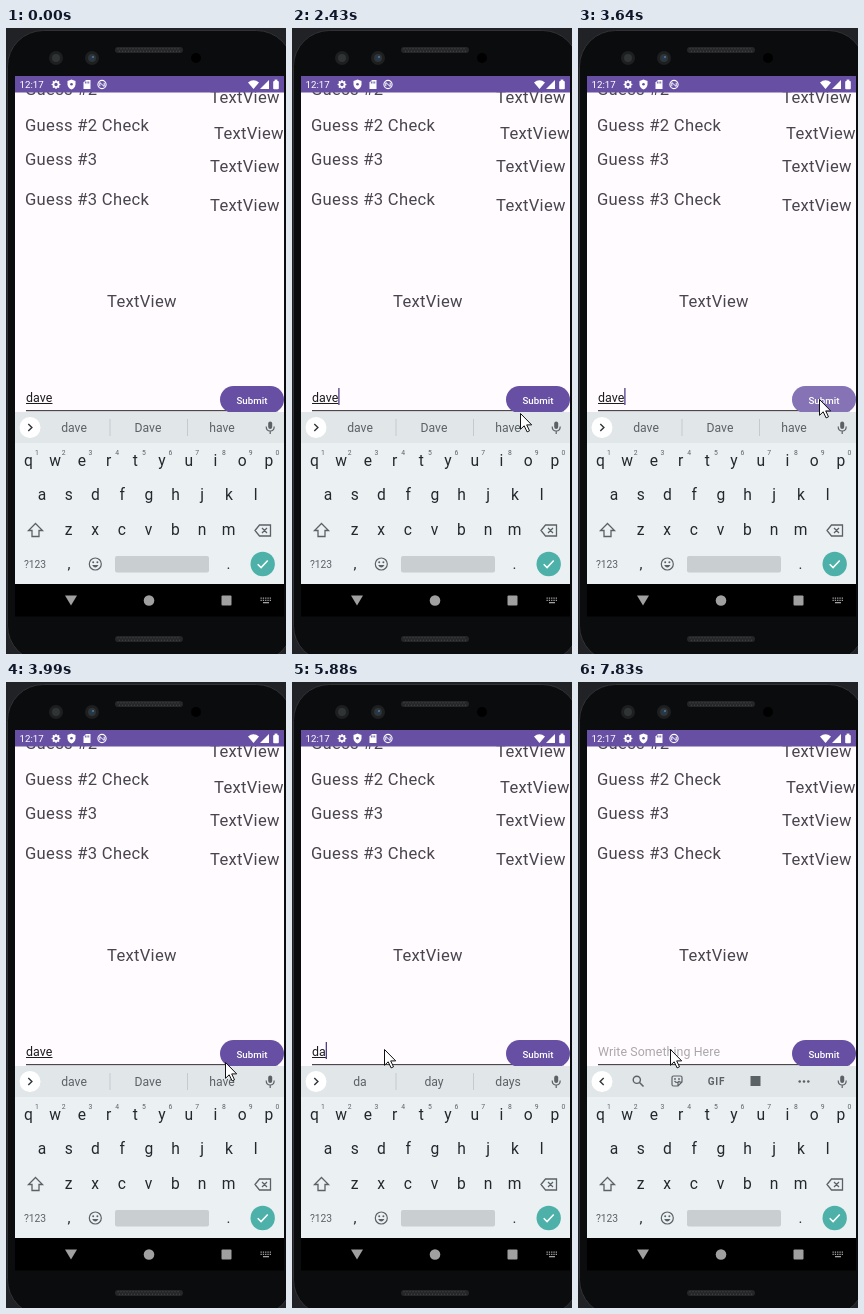
Animation of 280x626 px, one loop 8000 ms. Source, as an HTML page with a canvas:

```html
<!DOCTYPE html>
<html lang="en">
<head>
<meta charset="utf-8">
<title>Guessing app</title>
<style>
  html, body { margin: 0; width: 280px; height: 626px; overflow: hidden; background: #202226; }
  canvas { display: block; width: 280px; height: 626px; }
</style>
</head>
<body>
<canvas id="stage"></canvas>
<script>
const W = 280, H = 626, LOOP = 8000;
const canvas = document.getElementById('stage');
const ctx = canvas.getContext('2d');
const ratio = window.devicePixelRatio || 1;
canvas.width = W * ratio;
canvas.height = H * ratio;

const PURPLE = '#6750a4', INK = '#49454f', KEY = '#22292d', ICON = '#5b6266';

// Each burst: start, time per step, then pointer positions held step by step.
const bursts = [
  [330, 70, [[259, 608], [259, 556], [258, 505], [257, 468], [257, 447], [257, 438]]],
  [950, 70, [[245, 431], [238, 427], [232, 423], [228, 420], [226, 419]]],
  [2430, 80, [[228, 385], [231, 379], [235, 375], [238, 373], [240, 372], [241, 371]]],
  [3920, 70, [[236, 374], [219, 380], [196, 382], [171, 380], [148, 376], [125, 370],
              [106, 365], [96, 363], [91, 363], [91, 364], [92, 367]]]
];
const caretToggles = [130, 630, 1160, 1690, 2160, 2640, 3160, 3710, 4200, 4750, 5280, 6820, 7370, 7830];
const typed = [[0, 'dave'], [5610, 'dav'], [5810, 'da'], [6080, 'd'], [6350, '']];
const hints = [
  [0, ['dave', 'Dave', 'have']], [5680, ['dav', 'Dave', 'day']], [5880, ['da', 'day', 'days']],
  [6150, ['d', 'do', 'did']], [6420, []], [6490, null]
];

const latest = (list, t) => list.filter(([at]) => at <= t).pop()[1];
const clamp = v => Math.max(0, Math.min(1, v));

function rect(x, y, w, h, color, r = 0) {
  ctx.fillStyle = color;
  ctx.beginPath();
  ctx.roundRect(x, y, w, h, r);
  ctx.fill();
}

function disc(x, y, r, color) {
  ctx.fillStyle = color;
  ctx.beginPath();
  ctx.arc(x, y, r, 0, Math.PI * 2);
  ctx.fill();
}

function ring(x, y, r, color, width = 1.2) {
  ctx.strokeStyle = color;
  ctx.lineWidth = width;
  ctx.beginPath();
  ctx.arc(x, y, r, 0, Math.PI * 2);
  ctx.stroke();
}

function shape(x, y, d, { fill, stroke, width = 1.2 }) {
  const path = new Path2D(d);
  ctx.save();
  ctx.translate(x, y);
  if (fill) { ctx.fillStyle = fill; ctx.fill(path); }
  if (stroke) { ctx.strokeStyle = stroke; ctx.lineWidth = width; ctx.stroke(path); }
  ctx.restore();
}

function text(str, x, y, size, color, { align = 'left', weight = 400, spacing = 0 } = {}) {
  ctx.font = `${weight} ${size}px Roboto, sans-serif`;
  ctx.letterSpacing = spacing + 'px';
  ctx.textAlign = align;
  ctx.fillStyle = color;
  ctx.fillText(str, x, y);
  return ctx.measureText(str).width;
}

function speaker(y) {
  rect(109, y - 3, 68, 6, '#252627', 3);
  for (let row = 0; row < 2; row++)
    for (let x = 112 + row * 1.5; x < 175; x += 3) disc(x, y - 1.2 + row * 2.4, .7, '#414344');
}

function drawPhone() {
  rect(0, 0, W, H, '#202226');
  rect(1.5, 2.5, 285, 631, '#0b0c0d', 36);
  ctx.strokeStyle = '#303236';
  ctx.lineWidth = 1;
  ctx.stroke();
  speaker(22);
  speaker(611);
  for (const x of [50, 86]) {
    disc(x, 30, 7, '#1d1f20');
    disc(x, 30, 4, '#303435');
  }
  disc(86, 30, 2.5, '#26394d');
  disc(87, 29, 1, '#5b7691');
  disc(190, 30, 5, '#000');
}

function drawStatusBar() {
  rect(9, 48, 269, 16.5, PURPLE);
  const white = '#fff';
  text('12:17', 13.5, 60.3, 9.7, white);
  ring(50, 56.5, 2.6, white, 1.8);
  for (let i = 0; i < 8; i++) {
    const a = i * Math.PI / 4;
    disc(50 + Math.cos(a) * 3.7, 56.5 + Math.sin(a) * 3.7, .8, white);
  }
  shape(65.5, 56.5, 'M0-5L4-3.4V0Q3.6 3.6 0 5Q-3.6 3.6-4 0V-3.4Z', { fill: white });
  disc(65.5, 56.3, 1.3, PURPLE);
  shape(81, 56.5, 'M-1-4.5H3.5V4.5H-3.5V-2Z', { fill: white });
  for (const x of [79.3, 81, 82.7]) rect(x - .4, 53.4, .9, 2, PURPLE);
  ring(96, 56.5, 4.1, white, 1.1);
  shape(96, 56.5, 'M-2.2 1.8V-2L2.2 2V-1.8', { stroke: white, width: 1 });
  shape(247.5, 56.5, 'M0 4.5L-5.5-2Q0-6.5 5.5-2Z', { fill: white });
  shape(259, 56.5, 'M4-4.5V4.5H-5Z', { fill: white });
  rect(267.2, 53, 5.6, 8.3, white, 1);
  rect(268.6, 51.6, 2.8, 2, white);
}

function drawContent() {
  rect(9, 48, 269, 336, '#fffbfe');
  const labels = [
    ['Guess #2', 19, 67], ['TextView', 204, 75], ['Guess #2 Check', 19, 103], ['TextView', 208, 111],
    ['Guess #3', 19, 137.3], ['TextView', 204, 144], ['Guess #3 Check', 19, 177], ['TextView', 204, 183],
    ['TextView', 101, 279]
  ];
  ctx.save();
  ctx.beginPath();
  ctx.rect(9, 64, 269, 320);
  ctx.clip();
  for (const [label, x, y] of labels) text(label, x, y, 16.6, INK, { spacing: .3 });
  ctx.restore();
}

function drawField(t) {
  const word = latest(typed, t);
  const caretOn = caretToggles.filter(at => at <= t).length % 2 === 1;
  let width = 0;
  rect(20, 382, 252, 1.3, '#4a474e');
  if (word) {
    width = text(word, 20, 373.5, 12.4, '#1c1b1f', { spacing: .08 });
    rect(20, 375, width, 1, '#1c1b1f');
  } else {
    text('Write Something Here', 20, 373.5, 12.4, '#aaa7aa', { spacing: .08 });
  }
  if (caretOn) rect(20 + width - (word ? .2 : 0), 360, 1.3, 17, '#4f3d8a');
}

function drawButton(t) {
  ctx.save();
  ctx.beginPath();
  ctx.rect(9, 340, 269, 44);
  ctx.clip();
  rect(214, 358, 64, 27, PURPLE, 13.5);
  if (t >= 3270 && t < 3710) {
    ctx.clip();
    const grow = clamp((t - 3230) / 250);
    ctx.globalAlpha = .2 * clamp((t - 3230) / 90);
    disc(241 + 5 * grow, 371.5, 8 + 32 * grow, '#fff');
    ctx.globalAlpha = 1;
  }
  text('Submit', 246, 375.5, 9.7, '#fff', { align: 'center', weight: 500, spacing: .05 });
  ctx.restore();
}

function drawTools() {
  ring(58.8, 397.8, 3.6, ICON, 1.4);
  shape(61.5, 400.5, 'M0 0L4 4', { stroke: ICON, width: 1.6 });
  shape(99, 399, 'M-5-3.5Q-5-5-3.5-5H3.5Q5-5 5-3.5V1L1 5H-3.5Q-5 5-5 3.5ZM5 1H1V5M-2.5 0Q0 3 2.5 0', { stroke: ICON });
  disc(97, 397, .9, ICON);
  disc(101, 397, .9, ICON);
  text('GIF', 138.5, 402.7, 10, ICON, { align: 'center', weight: 700, spacing: .8 });
  rect(172.5, 394, 10, 10, ICON);
  for (const x of [221.7, 226, 230.3]) disc(x, 399.5, 1.3, ICON);
}

function drawStrip(t) {
  rect(9, 384, 269, 31, '#e1e6e9');
  const words = latest(hints, t);
  disc(24, 399.5, 10.5, '#fff');
  const side = words ? 1 : -1;
  shape(24, 399.5, `M${-1.7 * side}-3.6L${1.9 * side} 0L${-1.7 * side} 3.6`, { stroke: '#30363a', width: 1.4 });
  if (words) {
    words.forEach((word, i) => text(word, 68 + i * 74, 404, 12.2, ICON, { align: 'center' }));
    for (const x of [103.5, 181]) rect(x, 391, 1, 17, '#c4cace');
  } else {
    drawTools();
  }
  rect(262.2, 393.5, 4, 7.5, ICON, 2);
  shape(264.2, 399, 'M-4-.5Q-4 4 0 4Q4 4 4-.5M0 4V7', { stroke: ICON });
}

function drawKeys() {
  rect(9, 415, 269, 141, '#ebf0f3');
  const rows = [['qwertyuiop', 22.5, 437.5], ['asdfghjkl', 36, 472], ['zxcvbnm', 62.5, 507]];
  rows.forEach(([letters, left, y], row) => [...letters].forEach((letter, i) => {
    const x = left + i * 26.7;
    text(letter, x, y, 15.6, KEY, { align: 'center' });
    if (row === 0) text(String((i + 1) % 10), x + 8.5, 426.5, 6.8, ICON, { align: 'center' });
  }));
  shape(29.5, 502.5, 'M0-7L7 0H3.5V6H-3.5V0H-7Z', { stroke: ICON, width: 1.3 });
  shape(257, 502.5, 'M-8 0L-3.5-5.5H7.5V5.5H-3.5ZM-1-2.5L4 2.5M4-2.5L-1 2.5', { stroke: ICON, width: 1.3 });
  text('?123', 29, 540, 10.3, ICON, { align: 'center' });
  text(',', 63, 540.5, 15, KEY, { align: 'center' });
  ring(89.3, 536, 6, ICON);
  disc(87.2, 534.3, 1, ICON);
  disc(91.4, 534.3, 1, ICON);
  shape(89.3, 537, 'M-3.2 0Q0 5 3.2 0Z', { fill: ICON });
  rect(109, 528, 94, 16.5, '#c9ced1', 2);
  text('.', 222.5, 540.5, 15, KEY, { align: 'center' });
  disc(256.7, 536, 12.2, '#4db1a9');
  shape(256.7, 536, 'M-5 .2L-1.6 3.6L5-3.4', { stroke: '#fff', width: 1.5 });
}

function drawNavigation() {
  const grey = '#a0a0a0';
  rect(9, 556, 269, 32.5, '#000');
  shape(65, 572, 'M-6-4.5H6L0 5.5Z', { fill: grey });
  disc(143, 572.5, 5.3, grey);
  rect(215.5, 567.5, 10, 10, grey, 1);
  for (let row = 0; row < 2; row++)
    for (let i = 0; i < 5; i++) rect(254.5 + i * 2.3, 569.5 + row * 2.2, 1.3, 1.3, grey);
  rect(257, 574, 6, 1.3, grey);
}

function drawPointer(t) {
  const burst = bursts.filter(([start]) => start <= t).pop();
  if (!burst) return;
  const [start, step, points] = burst;
  const [x, y] = points[Math.min(points.length - 1, Math.floor((t - start) / step))];
  shape(x + .5, y + .5, 'M0 0V15.8L3.7 12.3L6.6 18.4L9 17.3L6.2 11.4H11.2Z',
    { fill: '#fff', stroke: '#111', width: 1 });
}

function draw(t) {
  ctx.setTransform(ratio, 0, 0, ratio, 0, 0);
  drawPhone();
  drawContent();
  drawStatusBar();
  drawField(t);
  drawButton(t);
  drawStrip(t);
  drawKeys();
  drawNavigation();
  drawPointer(t);
}

const begin = performance.now();
function tick() {
  draw((performance.now() - begin) % LOOP);
  requestAnimationFrame(tick);
}
tick();
</script>
</body>
</html>
```
